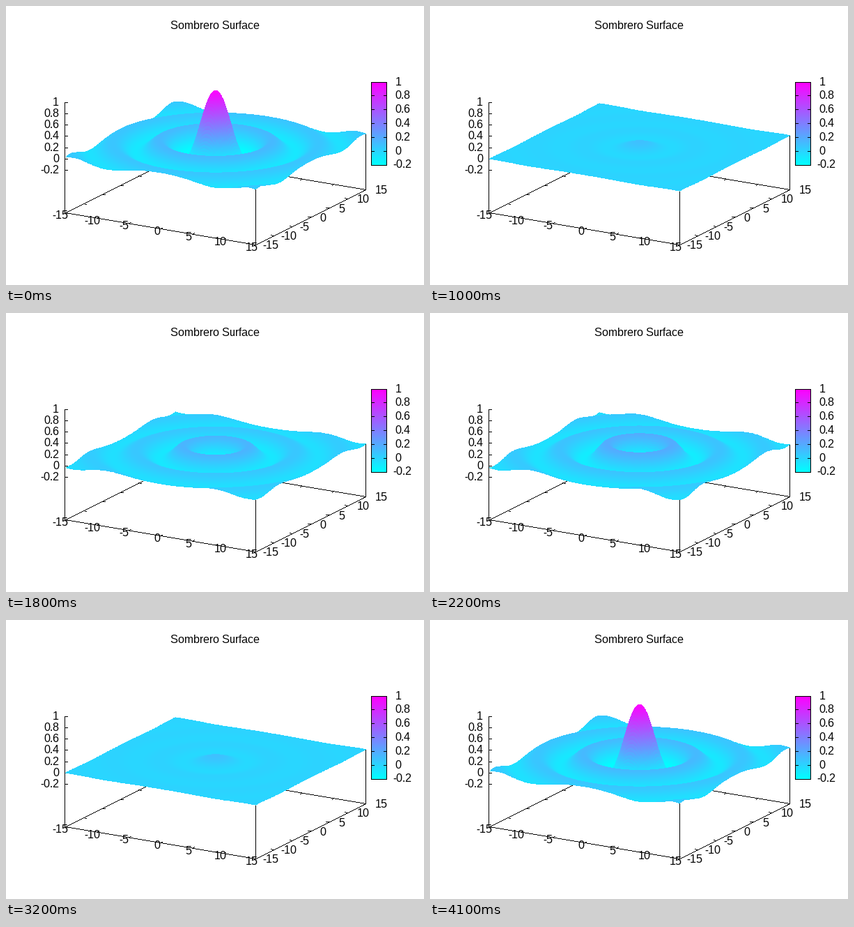
Recreate the animation shown at these times as a matplotlib script. Size 600 by 400 pixels, loop 4.2 s.

```python
import numpy as np
import matplotlib.pyplot as plt
from matplotlib.animation import FuncAnimation
from matplotlib.collections import LineCollection, QuadMesh

W, H, DPI = 600, 400, 100
PX = 72 / DPI
FRAMES, STEP_MS = 42, 100
SAMPLES = 200
HALF = 15
Z_SCALE = 81.3
BASE_Z = -77.3 / Z_SCALE
Z_FLOOR = -0.3

plt.rcParams["font.family"] = "Liberation Sans"
plt.rcParams["font.size"] = 16 * PX
plt.rcParams["text.hinting"] = "default"
plt.rcParams["text.hinting_factor"] = 1


def project(x, y, z):
    """Map surface coordinates to stage pixels."""
    sx = 300.9 + 9.1 * x + 5.265 * y
    sy = 202.7 + 1.53 * x - 2.643 * y - Z_SCALE * z
    return sx, sy


def cool(z):
    """Cyan to magenta over the height range -0.2 to 1."""
    v = np.clip((np.asarray(z) + 0.2) / 1.2, 0, 1)
    return np.stack([v, 1 - v, np.ones_like(v)], axis=-1)


def amplitude(frame):
    """Triangle wave 1 -> -1 -> 1; the first pose is held for two frames."""
    k = max(frame - 1, 0)
    return abs(20 - k) / 10 - 1


def dots(segments):
    """Split lines into one tiny dash per covered pixel."""
    result = []
    for a, b in segments:
        a, b = np.floor(a), np.floor(b)
        count = int(np.abs(b - a).max()) + 1
        centres = np.floor(np.linspace(a, b, count) + 0.5) + 0.5
        result += [[(x - 0.1, y), (x + 0.1, y)] for x, y in centres]
    return result


fig = plt.figure(figsize=(W / DPI, H / DPI), dpi=DPI, facecolor="white")
ax = fig.add_axes([0, 0, 1, 1])
ax.axis("off")


def add_lines(segments, zorder):
    lines = LineCollection(dots(segments), colors="black",
                           linewidths=0.5 * PX, antialiaseds=False,
                           capstyle="butt", zorder=zorder)
    lines.set_snap(False)
    ax.add_collection(lines)
    return lines


def label(x, y, text, ha):
    ax.text(x, y, text, ha=ha, va="baseline", color="black", zorder=5)


# Surface grid, ordered from back to front
xs = np.linspace(-HALF, HALF, SAMPLES)
gx, gy = np.meshgrid(xs, xs[::-1])
radius = np.hypot(gx, gy)
sombrero = np.sin(radius) / radius


def make_surface(amp):
    z = np.maximum(amp * sombrero, Z_FLOOR)
    points = np.floor(np.stack(project(gx, gy, z), axis=-1)) + 0.5
    mean = (z[:-1, :-1] + z[:-1, 1:] + z[1:, 1:] + z[1:, :-1]) / 4
    mesh = QuadMesh(points, antialiased=False, linewidths=0,
                    facecolors=cool(mean.ravel()), edgecolors="none",
                    zorder=2)
    mesh.set_snap(False)
    ax.add_collection(mesh, autolim=False)
    return mesh


def posts(amp):
    """Verticals from the base up to the front and right corners."""
    top = amp * sombrero[0, 0]
    return [(project(HALF, y, BASE_Z), project(HALF, y, top))
            for y in (-HALF, HALF)]


# Base outline, ticks and axis labels
segments = []
base = [(-HALF, -HALF), (HALF, -HALF), (HALF, HALF), (-HALF, HALF)]
for a, b in zip(base, base[1:] + base[:1]):
    segments.append([project(*a, BASE_Z), project(*b, BASE_Z)])


def tick(x, y, dx, dy):
    px, py = project(x, y, BASE_Z)
    segments.append([(px, py), (px + dx, py + dy)])
    return px, py


for v in range(-HALF, HALF + 1, 5):
    px, py = tick(v, -HALF, 2.7, -1.4)
    label(px - (7.5 if v < 0 else 5.5), py + 8.5, str(v), "center")
    tick(v, HALF, -2.7, 1.4)
    px, py = tick(HALF, v, -4, -0.7)
    label(px + (10 if v < 0 else 13.4), py + 5.8, str(v), "left")
    tick(-HALF, v, 4, 0.7)

# Height axis and colour box
left, right, top, bottom = 524, 546, 109, 228
box_lines = [[(left, top), (right, top)], [(left, bottom), (right, bottom)],
             [(left, top), (left, bottom)], [(right, top), (right, bottom)]]
zero_y = project(-HALF, -HALF, 0)[1]
segments.append([(84, zero_y - Z_SCALE), (84, 296)])
for i in range(-1, 6):
    z = i / 5
    text = f"{z:g}"
    y = zero_y - Z_SCALE * z
    segments.append([(84, y), (88, y)])
    label(76, y + 4.5, text, "right")

    y = bottom - (z + 0.2) / 1.2 * (bottom - top)
    box_lines += [[(left, y), (left + 4, y)], [(right - 4, y), (right, y)]]
    label(555.3 if z < 0 else 558.5, y + 4.5, text, "left")

label(300, 33, "Sombrero Surface", "center")
add_lines(segments, 1)
add_lines(box_lines, 4)
ramp = cool(np.linspace(1, -0.2, bottom - top))[:, None, :]
ax.imshow(ramp, extent=(left + 0.5, right + 0.5, bottom + 0.5, top + 0.5),
          aspect="auto", interpolation="nearest", zorder=3)

post_lines = add_lines(posts(1), 1)
surface = make_surface(1)

ax.set_xlim(0, W)
ax.set_ylim(H, 0)


def update(frame):
    global surface
    amp = amplitude(frame)
    surface.remove()
    surface = make_surface(amp)
    post_lines.set_segments(dots(posts(amp)))
    return surface, post_lines


anim = FuncAnimation(fig, update, frames=FRAMES, interval=STEP_MS,
                     repeat=True, repeat_delay=0, blit=False)
plt.show()
```
